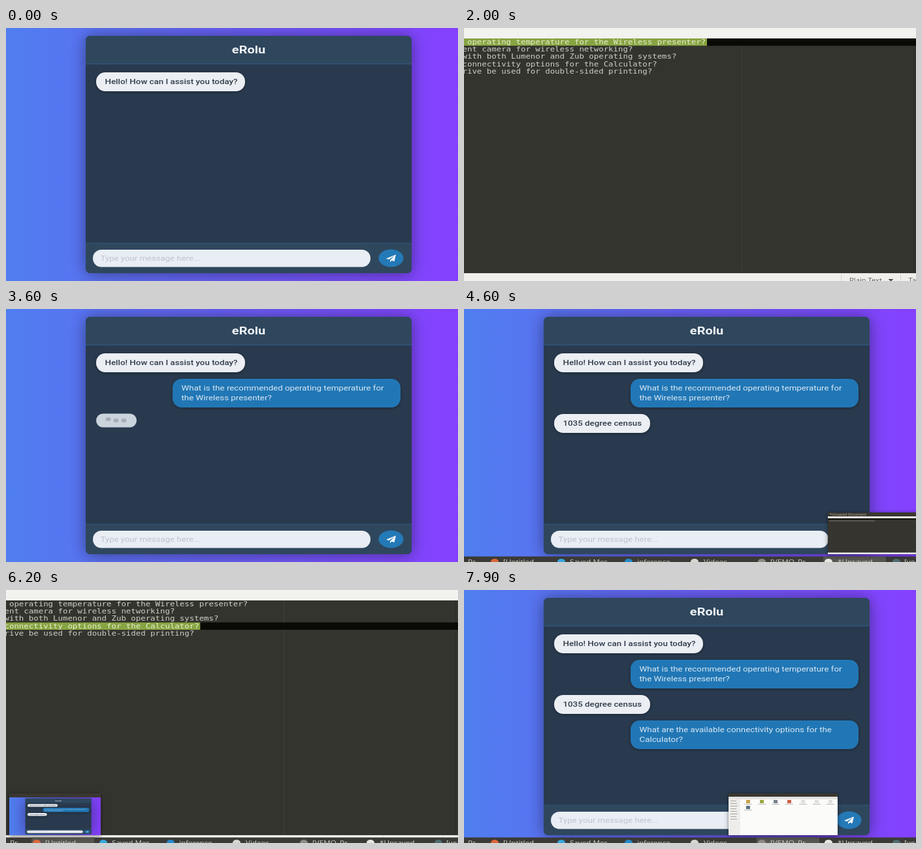
These frames come from a looping animation (692 px wide and 388 px high, 8000 ms). An HTML page with a canvas:

```html
<!DOCTYPE html>
<html lang="en">
<head>
<meta charset="utf-8">
<title>Chat demo</title>
<style>
  html, body { margin: 0; width: 100%; height: 100%; overflow: hidden; }
  canvas { display: block; width: 100vw; height: 100vh; }
</style>
</head>
<body>
<canvas id="stage" width="692" height="388"></canvas>
<script>
const ctx = document.getElementById('stage').getContext('2d');
const W = 692, H = 388, LOOP = 8000, TICK = 100;
const WIDEN = 1.28;
const UI = 'Roboto, sans-serif';
const SYSTEM = '"Open Sans", sans-serif';
const CODE = '"DejaVu Sans Mono", monospace';

const FIRST = ['What is the recommended operating temperature for', 'the Wireless presenter?'];
const SECOND = ['What are the available connectivity options for the', 'Calculator?'];
const LINES = [
  ' operating temperature for the Wireless presenter?',
  'ent camera for wireless networking?',
  'with both Lumenor and Zub operating systems?',
  'connectivity options for the Calculator?',
  'rive be used for double-sided printing?'
];
const TASKS = [
  [-8, null, 6, 'Pr'],
  [47, '#d9673a', 60, '[Untitled'],
  [149, '#38a5dc', 162, 'Saved Mes'],
  [252, '#2489ca', 265, 'inference'],
  [353, '#d8d6d0', 367, 'Videos'],
  [456, '#8d8a82', 469, '[VEMO_Pr'],
  [558, '#e8e6e0', 572, '*Unsaved'],
  [662, '#506b70', 674, '[ve']
];

const within = (t, from, to) => t >= from && t < to;
const progress = (t, from, to) => Math.min(1, Math.max(0, (t - from) / (to - from)));

function rect(x, y, w, h, color) {
  ctx.fillStyle = color;
  ctx.fillRect(x, y, w, h);
}

function pill(x, y, w, h, r, color) {
  ctx.fillStyle = color;
  ctx.beginPath();
  ctx.roundRect(x, y, w, h, r);
  ctx.fill();
}

function oval(x, y, rx, ry, color) {
  ctx.fillStyle = color;
  ctx.beginPath();
  ctx.ellipse(x, y, rx, ry, 0, 0, 2 * Math.PI);
  ctx.fill();
}

function text(str, x, y, font, color, align = 'left') {
  ctx.save();
  ctx.translate(x, y);
  ctx.scale(WIDEN, 1);
  ctx.font = font;
  ctx.fillStyle = color;
  ctx.textAlign = align;
  ctx.fillText(str, 0, 0);
  ctx.restore();
}

function withShadow(blur, alpha, draw) {
  ctx.save();
  ctx.shadowColor = `rgba(0,0,0,${alpha})`;
  ctx.shadowBlur = blur;
  ctx.shadowOffsetY = 1;
  draw();
  ctx.restore();
}

function bubble(x, y, w, lines, mine) {
  const h = lines.length * 15 + 14;
  withShadow(5, 0.35, () => pill(x, y, w, h, 14, mine ? '#2177b5' : '#ebeef3'));
  lines.forEach((line, i) => text(line, x + 13.5, y + 18 + i * 15,
    `${mine ? 400 : 500} 10.4px ${UI}`, mine ? '#d9e8f5' : '#303c4a'));
}

function typingDots(t) {
  pill(138, 160.5, 62, 21, 10.5, '#cbd3dc');
  for (let i = 0; i < 3; i++) {
    const lift = Math.max(0, Math.sin((t - 3450 - i * 200) / 1200 * 2 * Math.PI)) * 3;
    oval(156.5 + i * 12, 171 - lift, 4, 3, '#a6afb9');
  }
}

function paperPlane() {
  ctx.fillStyle = '#f2f7fc';
  ctx.beginPath();
  [[597, 347.5], [582, 353.5], [586, 355], [594.5, 349.5], [588, 356], [588, 359], [590.5, 356.5], [594.5, 358]]
    .forEach(([x, y]) => ctx.lineTo(x, y));
  ctx.fill();
}

function drawChat({ t, asked, typing, answered, askedAgain, draft, caret }) {
  const sky = ctx.createLinearGradient(0, 0, W, 0);
  sky.addColorStop(0, '#4f7eef');
  sky.addColorStop(1, '#8540ff');
  rect(0, 0, W, H, sky);

  withShadow(24, 0.42, () => pill(122, 12, 499, 364, 7, '#293a4f'));
  pill(122, 12, 499, 43, [7, 7, 0, 0], '#2f475d');
  pill(122, 330, 499, 46, [0, 0, 7, 7], '#2f475d');
  rect(122, 54.5, 499, 1, '#32618d');
  rect(122, 329.5, 499, 1, '#32587d');
  text('eRolu', 371.5, 38.5, `700 15.6px ${UI}`, '#f0f3f7', 'center');

  bubble(138, 68, 228, ['Hello! How can I assist you today?']);
  if (asked) bubble(255, 107, 349, FIRST, true);
  if (typing) typingDots(t);
  if (answered) bubble(138, 161, 147, ['1035 degree census']);
  if (askedAgain) bubble(255, 200, 349, SECOND, true);

  pill(133, 340, 425, 26.5, 13, '#e9edf4');
  const font = `400 10.3px ${UI}`;
  if (draft) {
    text(draft, 144, 356.5, font, '#4c5560');
    if (caret) {
      ctx.font = font;
      rect(144 + ctx.measureText(draft + ' ').width * WIDEN + 1, 347.5, 1, 11, '#3c4650');
    }
  } else {
    text('Type your message here...', 144.5, 356.5, font, '#bfc4cc');
  }
  oval(589.5, 353, 19, 13.5, '#2479b7');
  paperPlane();
}

function drawEditor(current, selected) {
  rect(0, 0, W, H, '#34342f');
  rect(0, 0, W, 16, '#f2f2ee');
  rect(425, 16, 1, 360, '#3f3f3a');
  rect(688, 16, 1, 360, '#2a2a26');

  const top = 16 + current * 11.25;
  rect(0, top, W, 11.25, '#090a05');
  const end = LINES[current].length * 7.47 - 1.5;
  if (selected) rect(end * (1 - selected), top, end * selected, 11.25, '#87a442');
  LINES.forEach((line, i) =>
    text(line, -2.5, 24.8 + i * 11.25, `9.69px ${CODE}`,
      i === current && selected ? '#e6edcf' : '#cfcfc6'));

  rect(0, 376, W, 12, '#f0efec');
  rect(577, 377, 1, 11, '#d5d4d0');
  rect(668, 377, 1, 11, '#d5d4d0');
  text('Plain Text', 590, 389.5, `8.8px ${SYSTEM}`, '#55554f');
  text('Ta', 680.5, 389.5, `8.8px ${SYSTEM}`, '#55554f');
  ctx.fillStyle = '#44443f';
  ctx.beginPath();
  ctx.moveTo(649.5, 385);
  ctx.lineTo(657.5, 385);
  ctx.lineTo(653.5, 388.5);
  ctx.fill();
}

function drawTaskbar(active) {
  rect(0, 379.5, W, 9, '#3b3a37');
  TASKS.forEach(([iconX, color, x, label], i) => {
    if (i === active) rect(iconX - 8, 379.5, 96, 9, '#575550');
    if (color) oval(iconX, 387.5, 6, 4.5, color);
    text(label, x, 390.5, `9.1px ${SYSTEM}`, '#d4d1ca');
  });
}

function previewFrame(x, w, color) {
  withShadow(6, 0.5, () => rect(x, 312, w, 64, color));
  rect(x, 312, w, 6, '#3a3731');
}

function editorPreview() {
  previewFrame(557, 140, '#35342f');
  text('*Unsaved Document', 560, 317, `4.5px ${SYSTEM}`, '#b5b2aa');
  rect(557, 318, 140, 3, '#eeeeea');
  rect(557, 321, 140, 2, '#11120d');
  rect(559, 324.5, 70, 1, '#77776f');
  rect(557, 373.5, 140, 2.5, '#eeeeea');
}

function folderPreview() {
  previewFrame(405, 167, '#fbfbfa');
  rect(405, 317, 167, 4, '#e5e3df');
  rect(405, 321, 18, 55, '#eeedea');
  for (let i = 0; i < 8; i++) rect(408, 323 + i * 4, 9 + i % 3, 1, '#aaa8a3');
  const colors = ['#c8a24a', '#9ba63e', '#77808c', '#d0604a', '#dededb', '#dededb', '#dededb', '#5d7183'];
  colors.forEach((color, i) => {
    const x = 432 + (i % 7) * 21, y = i < 7 ? 322 : 331;
    rect(x, y, 6, 5, color);
    rect(x - 3, y + 6, 12, 1, '#b9b8b4');
  });
}

function chatPreview(chat) {
  previewFrame(5, 140, '#fff');
  ctx.save();
  ctx.beginPath();
  ctx.rect(5, 318, 140, 58);
  ctx.clip();
  ctx.translate(5, 318);
  ctx.scale(140 / W, 58 / H);
  drawChat(chat);
  ctx.restore();
}

function iBeam(x, y) {
  const shape = () => {
    ctx.beginPath();
    ctx.moveTo(x - 3, y - 5);
    ctx.lineTo(x + 3, y - 5);
    ctx.moveTo(x, y - 5);
    ctx.lineTo(x, y + 5);
    ctx.moveTo(x - 3, y + 5);
    ctx.lineTo(x + 3, y + 5);
    ctx.stroke();
  };
  ctx.strokeStyle = '#f4f4f4';
  ctx.lineWidth = 2.6;
  shape();
  ctx.strokeStyle = '#33373c';
  ctx.lineWidth = 1.3;
  shape();
}

function draw(t) {
  const firstDraft = within(t, 3200, 3400);
  const secondDraft = within(t, 6600, 7300);
  const chat = {
    t,
    asked: t >= 3400,
    typing: within(t, 3500, 4100),
    answered: t >= 4100,
    askedAgain: t >= 7300,
    draft: firstDraft ? FIRST.join(' ') : secondDraft ? SECOND.join(' ') : '',
    caret: true
  };

  if (within(t, 1300, 3000)) {
    drawEditor(0, progress(t, 1800, 2000));
  } else if (within(t, 4800, 6400)) {
    if (t < 5100) drawEditor(0, 1);
    else drawEditor(3, progress(t, 5300, 5600));
    if (within(t, 5000, 5600)) iBeam(304 - 304 * progress(t, 5300, 5600), 55);
  } else {
    drawChat(chat);
    if (within(t, 3100, 3400) || within(t, 6500, 7200)) iBeam(204, 357);
  }

  if (within(t, 900, 1300) || within(t, 4400, 4800)) {
    drawTaskbar(6);
    editorPreview();
  } else if (within(t, 2500, 3000) || within(t, 5900, 6400)) {
    drawTaskbar(1);
    chatPreview(chat);
  } else if (t >= 7700) {
    drawTaskbar(5);
    folderPreview();
  }
}

const start = performance.now();
function frame() {
  const elapsed = (performance.now() - start) % LOOP;
  draw(Math.floor(elapsed / TICK) * TICK);
  requestAnimationFrame(frame);
}
frame();
</script>
</body>
</html>
```
